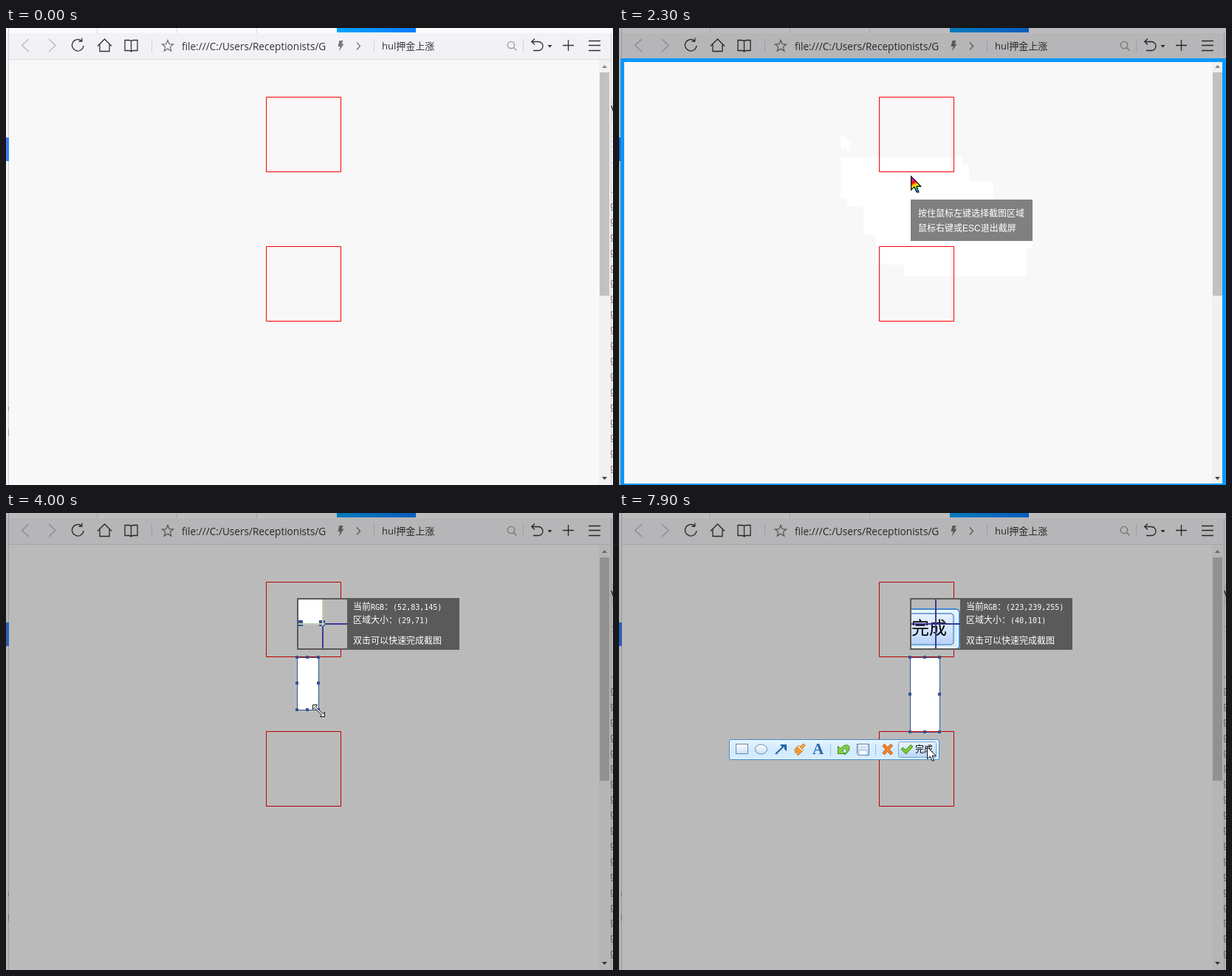
An HTML page that plays this animation: 822x618 px, repeating every 8 s.

```html
<!DOCTYPE html>
<html lang="zh">
<head>
<meta charset="utf-8">
<title>Screen capture demo</title>
<style>
html, body { margin: 0; width: 100%; height: 100%; overflow: hidden; }
#stage { display: block; width: 822px; height: 618px; }
text { white-space: pre; }
.ui { font: 13.6px "Open Sans", "Noto Sans CJK SC", "Noto Sans CJK", sans-serif; fill: #333; }
.cjk { font: 12px "Liberation Sans", "Noto Sans CJK SC", "Noto Sans CJK", sans-serif; fill: #fff; }
.num { font: 10px "DejaVu Sans Mono", monospace; }
.line { fill: none; stroke: #333; stroke-width: 1.3; }
.pale { stroke: #b9b9bd; }
.mid { stroke: #777; }
</style>
</head>
<body>
<svg id="stage" viewBox="0 0 822 618" xmlns="http://www.w3.org/2000/svg">
  <defs>
    <linearGradient id="tab"><stop stop-color="#00a4fb"/><stop offset="1" stop-color="#087cff"/></linearGradient>
    <linearGradient id="bar" x2="0" y2="1"><stop stop-color="#e6f5ff"/><stop offset=".5" stop-color="#d2eaff"/><stop offset="1" stop-color="#d6eeff"/></linearGradient>
    <linearGradient id="press" x2="0" y2="1"><stop stop-color="#e8f3ff"/><stop offset=".5" stop-color="#d3e6fd"/><stop offset="1" stop-color="#b6d3f9"/></linearGradient>
    <linearGradient id="glass" x2="0" y2="1"><stop stop-color="#fff"/><stop offset="1" stop-color="#c9e0f5"/></linearGradient>
    <linearGradient id="rainbow" x2=".35" y2="1">
      <stop offset=".12" stop-color="#c0f"/><stop offset=".3" stop-color="#f0208a"/><stop offset=".42" stop-color="#f00"/>
      <stop offset=".55" stop-color="#f90"/><stop offset=".68" stop-color="#ff0"/><stop offset=".82" stop-color="#3e3"/><stop offset="1" stop-color="#0cf"/>
    </linearGradient>
    <path id="arrow" d="M.5 .5V16.5L4.3 13L7 19H9.5L7 12.3H12Z"/>
  </defs>

  <g id="scene">
    <rect width="822" height="618" fill="#f8f8f8"/>
    <g id="under" fill="#fff"></g>

    <rect width="822" height="7" fill="#fbfbfb"/>
    <path d="M123.5 0V7M231.5 0V7M339.5 0V7" stroke="#ddd"/>
    <rect x="448" width="107" height="6" fill="url(#tab)"/>
    <rect y="7" width="822" height="35" fill="#f2f2f6"/>
    <path d="M4 42.5H819" stroke="#dcdcdf"/>
    <path class="line pale" d="M31 15L21.500 23.500L31 32M58 15L67 23.500L58 32"/>
    <path class="line" d="M102.500 17.500A7.800 7.800 0 1 0 105 24M102.800 13.500V18H98.500"/>
    <path class="line" d="M124 24.500L133.500 15L143 24.500M127 22.500V31.500H140V22.500"/>
    <path class="line" d="M169.500 17.500V32M169.500 17.500Q168 16.500 166 16.500H161V30.500H166.500Q168.500 30.500 169.500 32Q170.500 30.500 172.500 30.500H178V16.500H173Q171 16.500 169.500 17.500"/>
    <path d="M197.500 15V33M498.500 15V33M700.500 15V33" stroke="#d3d3d8"/>
    <path id="star" class="line mid"/>
    <text class="ui" x="238" y="30">file:///C:/Users/Receptionists/G</text>
    <path d="M451.500 17H456.500L454.500 21.500H457.500L451 31.500L452.500 25H449.500Z" fill="#777"/>
    <path class="line mid" d="M475 19.500L479.500 24.500L475 29.500"/>
    <text class="ui" x="509" y="29" style="font-size:13px">hul押金上涨</text>
    <g class="line" style="stroke:#999"><circle cx="684" cy="23" r="4.700"/><path d="M687.500 26.500L691.500 30.500"/></g>
    <path class="line" d="M716 14.500L711.800 18.500L716 22.500M712 18.500H721A6 6 0 0 1 721 30.500H714"/>
    <path d="M733.500 23H739.500L736.500 26.500Z" fill="#333"/>
    <path class="line" d="M754 23.500H769M761.500 16V31M789 17.500H805M789 23.500H805M789 30.500H805"/>

    <rect x="803" y="43" width="16" height="575" fill="#f1f1f1"/>
    <rect x="804" y="60" width="13" height="302" fill="#c1c1c1"/>
    <path d="M807 54L810.500 50L814 54Z" fill="#888"/>
    <path d="M807 607H814L810.500 611Z" fill="#444"/>
    <path d="M819.500 7V618" stroke="#cfcfcf"/>
    <rect x="820" y="7" width="2" height="611" fill="#f5f5f5"/>
    <rect x="820" y="96" width="2" height="30" fill="#e4e4e4"/>
    <path d="M819 153.500H822M819 160.500H822M819 182.500H822" stroke="#ccc"/>
    <text x="819" y="114" font-family="Liberation Sans, sans-serif" font-size="12">V</text>
    <g id="edge" font-family="Liberation Sans, sans-serif" font-size="12" fill="#777058"></g>
    <rect y="7" width="3" height="611" fill="#f3f3f3"/>
    <path d="M3.500 0V618" stroke="#cdcdcd"/>
    <path d="M3.500 512V518M3.500 542V552" stroke="#999"/>
    <rect y="148" width="4" height="32" fill="#3c7df5"/>

    <path d="M352.500 93.500h101v101h-101zM352.500 295.500h101v101h-101z" fill="none" stroke="#f00"/>

    <path id="dim" fill-rule="evenodd" fill-opacity=".25"/>
    <rect id="frame" x="4.500" width="815" fill="none" stroke="#0a97fb" stroke-width="5"/>
    <g id="pick"><path id="edges" fill="none" stroke="#345391"/><path id="grips" fill="#345391"/></g>
    <g id="panel">
      <rect x="394" y="115" width="220" height="70" fill="#5a5a5a"/>
      <rect x="396" y="117" width="66" height="66" fill="#b9b9b9"/>
    </g>

    <g id="tools">
      <rect x="149.500" y="306.500" width="284" height="27" rx="2.500" fill="url(#bar)" stroke="#3f8acb"/>
      <rect x="150.500" y="307.500" width="282" height="25" rx="1.500" fill="none" stroke="#fff" opacity=".6"/>
      <rect id="hover" x="378.500" y="309.500" width="51" height="21" rx="2" fill="url(#press)" stroke="#7ba6d4"/>
      <g fill="url(#glass)" stroke="#6789a8">
        <rect x="158.500" y="312.500" width="16" height="13"/>
        <ellipse cx="192.500" cy="319.500" rx="8" ry="6.500"/>
      </g>
      <path d="M212 326L224 314.500" stroke="#1e64a6" stroke-width="2"/>
      <path d="M218 313H227V322L224 319.500V316H220.500Z" fill="#1e64a6"/>
      <g transform="translate(244.500 319.500) rotate(45) scale(.9)" stroke="#c26a14">
        <rect x="-2" y="-10" width="4" height="8" rx="1" fill="#f9a53c"/>
        <rect x="-5" y="-3" width="10" height="3" fill="#fff0c8"/>
        <path d="M-5 0H5V8H2V5H0V8H-2V6H-5Z" fill="#f79b35"/>
      </g>
      <text x="262" y="326" font-family="Liberation Serif, serif" font-size="21" font-weight="bold" fill="#2a67ad">A</text>
      <path d="M286.500 312V328M347.500 312V328" stroke="#9cc3e2"/>
      <path d="M296.500 315V325.500H306L302.500 322Q305.500 317 308 319Q309.500 322 305 327Q312.500 323 312 316.500Q309 310 299.500 318.500Z" fill="#86cf45" stroke="#3f8f20"/>
      <path d="M322.500 312.500H338.500V327.500H324.500L322.500 325.500Z" fill="#bfd6ee" stroke="#5580ae"/>
      <path d="M325 313H336V319H325ZM326 322H335V327H326Z" fill="#fff"/>
      <path d="M326 315.500H335M326 317.500H335" stroke="#b4c9dc"/>
      <path d="M357 315L359.500 312.500L363.500 317L368 312.500L370.500 315L366 319.500L370.500 324.500L368 327L363.500 322.500L359.500 327L357 324.500L361 319.500Z" fill="#f4852a" stroke="#c4550c"/>
      <path d="M382 319.500L384.500 317L388 320.500L395 313.500L398 316L388.500 326Z" fill="#7cc832" stroke="#3f8a1c"/>
      <text class="cjk" x="401" y="323.500" style="fill:#000;font-weight:500">完成</text>
    </g>
  </g>

  <g id="info">
    <svg id="lens" x="396" y="117" width="66" height="66"><use href="#scene"/></svg>
    <g stroke-width="2">
      <path d="M429 117V183M396 150H462" stroke="#3e3a96"/>
      <path id="cross" stroke="#c0cfb0"/>
    </g>
    <text class="cjk" x="470" y="131">当前<tspan class="num">RGB</tspan>：<tspan class="num" id="rgb"></tspan></text>
    <text class="cjk" x="470" y="149">区域大小：<tspan class="num" id="size"></tspan></text>
    <text class="cjk" x="470" y="177">双击可以快速完成截图</text>
  </g>

  <g id="tip">
    <rect width="165" height="56" fill="#808080"/>
    <text class="cjk" x="10" y="22.500">按住鼠标左键选择截图区域</text>
    <text class="cjk" x="10" y="42.500">鼠标右键或ESC退出截屏</text>
  </g>
  <use id="pointer" href="#arrow" fill="#fff" stroke="#111"/>
  <use id="color" href="#arrow" fill="url(#rainbow)" stroke="#000"/>
  <path id="resize" d="M-8 -8H-2L-4 -5.500L5.500 4L8 2V8H2L4 5.500L-5.500 -4L-8 -2Z" fill="#fff" stroke="#111"/>
</svg>
<script>
const LOOP = 8000, STEP = 100;
const $ = id => document.getElementById(id);
const show = (id, on) => $(id).setAttribute('display', on ? 'inline' : 'none');
const set = (id, name, value) => $(id).setAttribute(name, value);
const place = (id, [x, y], extra = '') => set(id, 'transform', `translate(${x} ${y})${extra}`);
const box = (x, y, w, h) => `M${x} ${y}h${w}v${h}h${-w}z`;

// Hint box corner, one entry per step from TIP_START
const TIP_START = 1200;
const tips = [[386, 280], [351, 261], [348, 264], [331, 224], [300, 174], [309, 185], [342, 207], [385, 236],
  [394, 242], [395, 238], [394, 235], [395, 232], [394, 230], [394, 228], [394, 227]];
const enter = [[500, 797, 55], [600, 716, 118], [700, 594, 206], [800, 500, 262]];
const drag = [[3300, 3, 2], [3700, 15, 37], [4100, 33, 82], [4500, 39, 97], [4800, 40, 101]];
const leave = [[6900, 434, 296], [7200, 432, 300], [7500, 425, 308], [7600, 425, 308], [7900, 417, 316]];
const ORIGIN = [394, 195];

// Piecewise linear position, rounded to whole pixels
function along(keys, t) {
  if (t <= keys[0][0]) return keys[0].slice(1);
  for (let i = 1; i < keys.length; i++) {
    const [t0, x0, y0] = keys[i - 1], [t1, x1, y1] = keys[i];
    if (t <= t1) {
      const k = (t - t0) / (t1 - t0);
      return [Math.round(x0 + (x1 - x0) * k), Math.round(y0 + (y1 - y0) * k)];
    }
  }
  return keys[keys.length - 1].slice(1);
}

function pixelColor(t) {
  if (t >= 7700) return '(223,239,255)';
  if (t >= 7300) return '(207,231,255)';
  if (t >= 7000) return '(185,185,185)';
  if (t >= 4100 && t < 4400) return '(255,255,255)';
  return '(52,83,145)';
}

function drawHint(t) {
  const i = Math.max(0, Math.min(tips.length - 1, (t - TIP_START) / STEP));
  const [x, y] = tips[i];
  const whole = t >= 3100, top = whole ? -60 : 41;
  set('dim', 'd', box(0, 0, 822, 618) + box(2, top, 820, 620 - top));
  set('frame', 'y', top + 2.5);
  set('frame', 'height', 575 + 41 - top);
  place('tip', [x, y]);
  place('color', i === 3 ? [325, 182] : [x, y - 32], ' scale(1.15)');
  let trail = tips.slice(0, i).map(p => box(...p, 165, 56)).map(d => `<path d="${d}"/>`).join('');
  if (t > 1600) trail += '<use href="#arrow" transform="translate(300 141) scale(1.4)"/>';
  $('under').innerHTML = trail;
}

function drawPick(t) {
  const [x, y] = ORIGIN, [w, h] = along(drag, t);
  const moving = t >= 7000;
  const [cx, cy] = moving ? along(leave, t) : [x + w, y + h];
  const area = box(x, y, w, h);
  $('under').innerHTML = `<path d="${area}"/>`;
  set('dim', 'd', box(0, 0, 822, 618) + area);
  set('edges', 'd', box(x + .5, y + .5, w, h));
  let grips = '';
  for (const a of [0, .5, 1]) for (const b of [0, .5, 1])
    if (a !== .5 || b !== .5) grips += box(Math.floor(x + w * a) - 2, Math.floor(y + h * b) - 2, 4, 4);
  set('grips', 'd', grips);
  set('lens', 'viewBox', `${cx - 16} ${cy - 16} 33 33`);
  // The crosshair turns light where it lies on the selection's edges
  const left = Math.max(396, 424 - 2 * w), top = Math.max(117, 145 - 2 * h);
  set('cross', 'd', `M429 ${top}V153M${left} 150H432`);
  show('cross', !moving);
  $('rgb').textContent = pixelColor(t);
  $('size').textContent = `(${w},${h})`;
  place('resize', [cx + .5, cy + 1.5]);
  if (moving) place('pointer', [cx, cy]);
}

function draw(time) {
  const t = Math.floor(time % LOOP / STEP) * STEP;
  const hint = t >= 1100 && t < 3300, pick = t >= 3300;
  const arrow = t >= 7100;
  show('dim', hint || pick);
  show('frame', hint);
  show('color', hint);
  show('tip', hint && t >= TIP_START);
  for (const id of ['pick', 'panel', 'info']) show(id, pick);
  show('tools', t >= 6800);
  show('hover', t >= 7700);
  show('resize', pick && !arrow);
  show('pointer', t >= 500 && t < 1100 || arrow);
  if (hint) drawHint(t);
  else if (pick) drawPick(t);
  else {
    $('under').innerHTML = '';
    place('pointer', along(enter, t));
  }
}

let star = '';
for (let i = 0; i < 10; i++) {
  const r = i % 2 ? 3.6 : 8, a = Math.PI * (i / 5 - .5);
  star += `${i ? 'L' : 'M'}${(219 + r * Math.cos(a)).toFixed(1)} ${(24.5 + r * Math.sin(a)).toFixed(1)}`;
}
set('star', 'd', star + 'Z');

let edge = '';
for (let i = 0; i < 19; i++) edge += `<text x="818.5" y="${223 + i * 20.9}">${i ? 'g' : '.'}</text>`;
$('edge').innerHTML = edge;

const start = performance.now();
function tick() {
  draw(performance.now() - start);
  requestAnimationFrame(tick);
}
tick();
</script>
</body>
</html>
```
